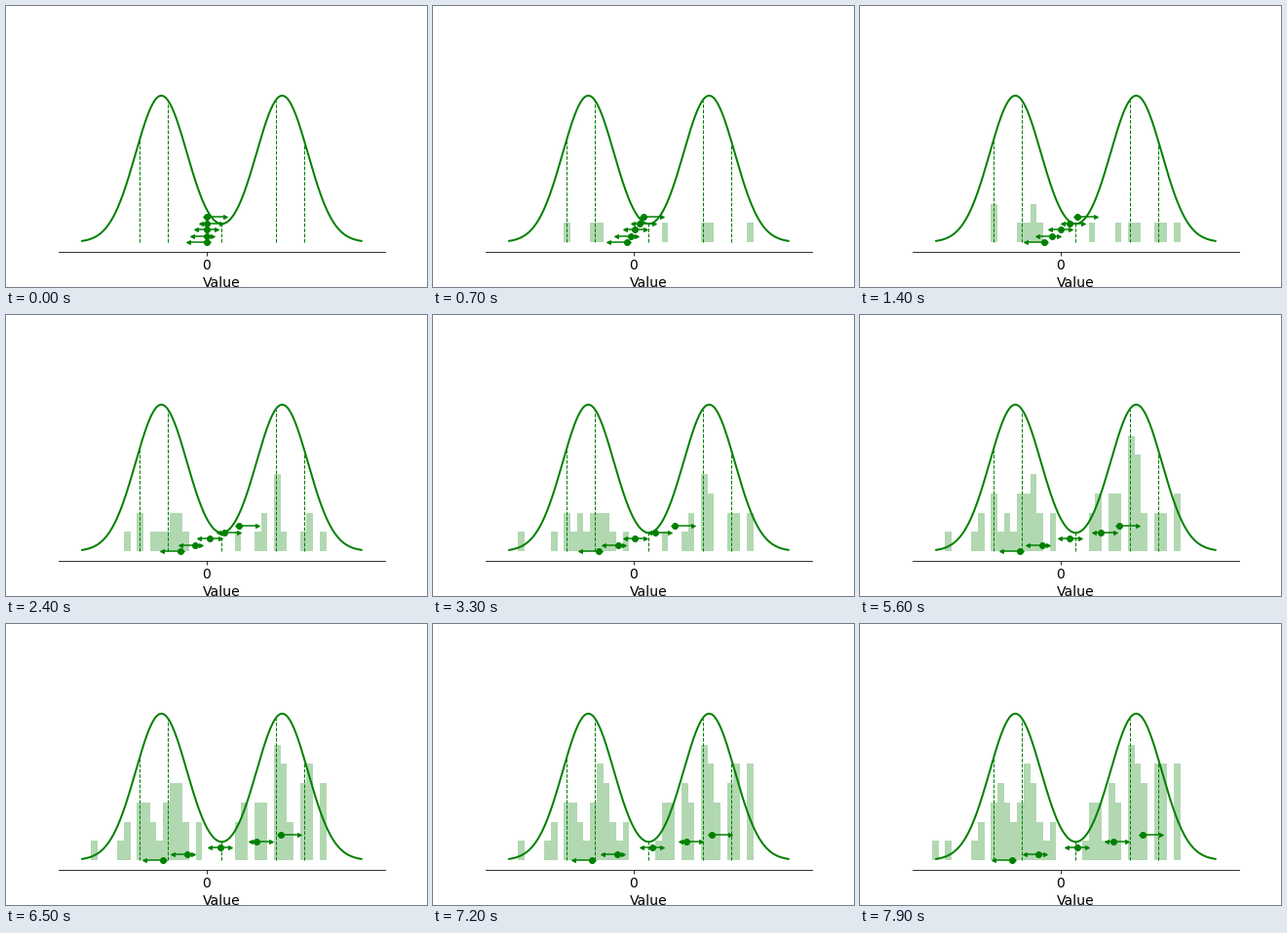
A matplotlib script that plays this animation: 432x288 px, repeating every 8000 ms.

```python
import numpy as np
import matplotlib.pyplot as plt
from matplotlib.animation import FuncAnimation

FRAMES, INTERVAL = 80, 100
GREEN = "green"
TAUS = np.array([0.1, 0.3, 0.5, 0.7, 0.9])
ROWS = np.linspace(0, 1.32, len(TAUS))
STEP = 0.1
XLIM, BINS = (-4.9, 5.9), 50
MEANS, SIGMA, PEAK = (-1.5, 2.5), 0.85, 7.6

# Histogram bin hit by each new sample, one sample per frame.
HITS = [
    33, 17, 40, 12, 27, 16, 34, 19, 31, 18, 38, 12, 37, 18,
    33, 14, 38, 17, 10, 33, 30, 15, 33, 31, 40, 14, 34,
    5, 37, 13, 34, 21, 16, 33, 30, 18, 9, 33, 40, 12, 28, 17, 34, 19, 21,
    30, 18, 16, 28, 34, 27, 28, 35, 35, 31, 10, 38, 37, 13, 38, 40, 13, 38,
    17, 37, 30, 40, 17, 27, 35, 26, 20, 29, 3, 37, 14, 13, 35, 15,
]

edges = np.linspace(*XLIM, BINS + 1)
width = edges[1] - edges[0]
samples = edges[HITS] + width / 2


def density(x):
    return PEAK * sum(np.exp(-((x - m) / SIGMA) ** 2 / 2) for m in MEANS)


def run_estimates():
    """Quantile regression: step up by tau, or down by 1 - tau."""
    path = [np.zeros(len(TAUS))]
    for s in samples:
        now = path[-1]
        path.append(now + STEP * np.where(s > now, TAUS, TAUS - 1))
    return path


path = run_estimates()

plt.rcParams["font.family"] = "DejaVu Sans"
fig = plt.figure(figsize=(6, 4), dpi=72)
ax = fig.add_axes([0.125, 0.125, 0.775, 0.755])
ax.set(xlim=XLIM, ylim=(-0.5, 10.5), yticks=[], xticks=[0])
ax.spines[["left", "top", "right"]].set_visible(False)
ax.tick_params(labelsize=14)
ax.set_xlabel("Value", fontsize=14)

bars = ax.bar(edges[:-1], np.zeros(BINS), width, align="edge",
              color=GREEN, alpha=0.3, linewidth=0)

x = np.linspace(-4.12, 5.12, 300)
ax.plot(x, density(x), color=GREEN, lw=2)

grid = np.linspace(*XLIM, 4001)
cdf = np.cumsum(density(grid))
for q in np.interp(TAUS, cdf / cdf[-1], grid):
    ax.plot([q, q], [0, density(q)], color=GREEN, lw=1, ls="--")

dots, = ax.plot([], [], "o", color=GREEN, ms=6, zorder=4)
shafts = [ax.plot([], [], color=GREEN, lw=1.5, zorder=3)[0] for _ in TAUS]
left, = ax.plot([], [], "<", color=GREEN, ms=4, zorder=3)
right, = ax.plot([], [], ">", color=GREEN, ms=4, zorder=3)


def update(i):
    counts = np.bincount(HITS[:i], minlength=BINS) if i else np.zeros(BINS)
    for bar, n in zip(bars, counts):
        bar.set_height(n)
    est = path[i]
    lo, hi = est - 0.68 * (1 - TAUS), est + 0.68 * TAUS
    dots.set_data(est, ROWS)
    left.set_data(lo, ROWS)
    right.set_data(hi, ROWS)
    for shaft, a, b, y in zip(shafts, lo, hi, ROWS):
        shaft.set_data([a, b], [y, y])
    return [*bars, dots, left, right, *shafts]


anim = FuncAnimation(fig, update, frames=FRAMES, interval=INTERVAL,
                     repeat=True, repeat_delay=0, blit=False)
plt.show()
```
